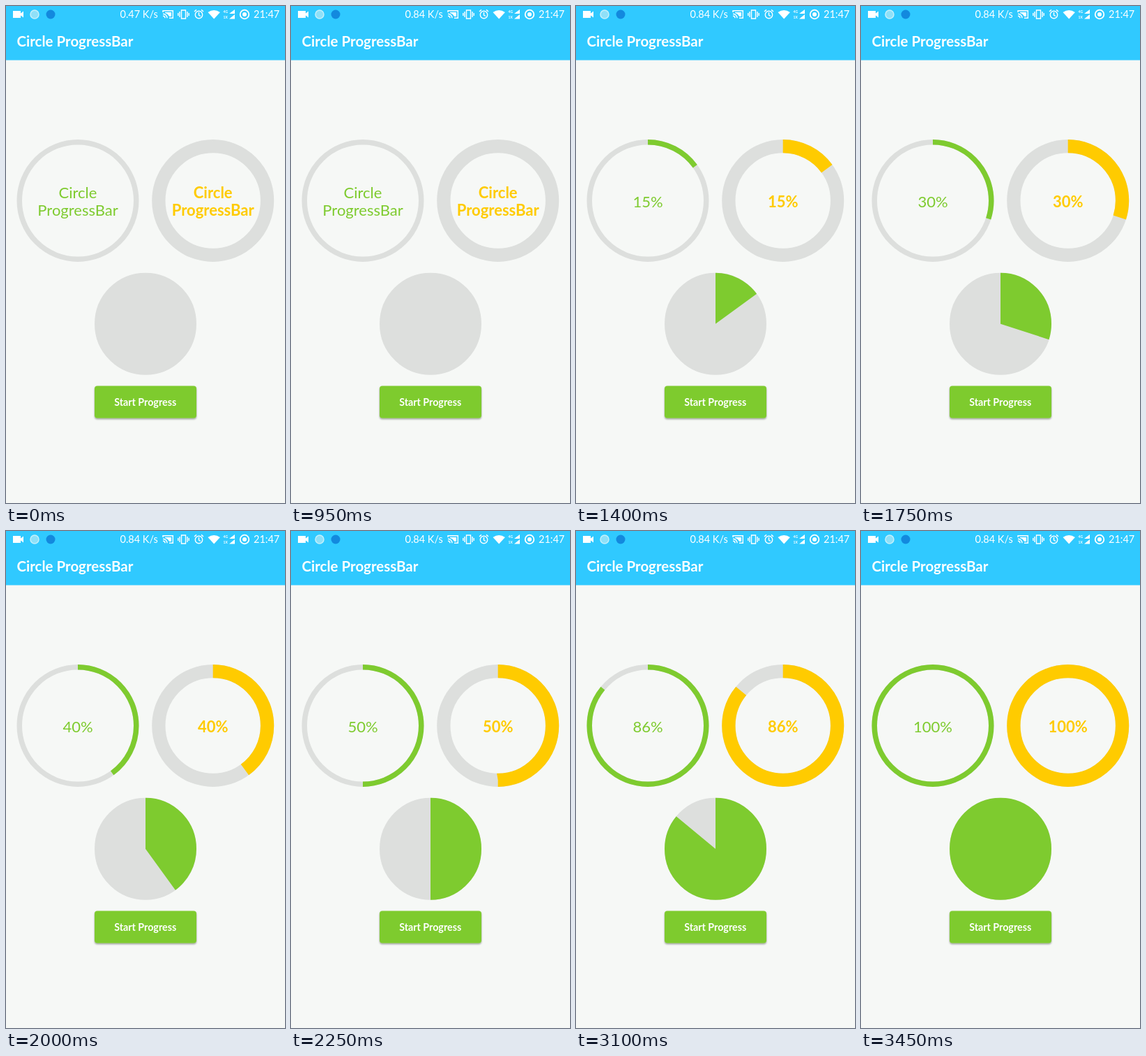
Animation of 400x711 px, one loop 3.95 s. Source, as an HTML page:

```html
<!DOCTYPE html>
<html lang="en">
<head>
<meta charset="utf-8">
<title>Circle ProgressBar</title>
<style>
  html, body { margin: 0; height: 100%; overflow: hidden; background: #f6f8f6; }
  svg { display: block; width: 100vw; height: 100vh; font-family: Lato, "Open Sans", sans-serif; }
  .bold { font-weight: 700; }
  .mid { text-anchor: middle; }
  .label { font-size: 22px; text-anchor: middle; }
  .line { fill: none; stroke: #fff; stroke-width: 1.4; }
  .track, .bar { fill: none; }
  .track { stroke: #dddfdd; }
  .green { stroke: #7ecb2f; }
  .yellow { stroke: #ffcb00; }
</style>
</head>
<body>
<svg viewBox="0 0 400 711">
  <defs>
    <filter id="shadow" x="-10%" y="-10%" width="120%" height="130%">
      <feDropShadow dx="0" dy="1.5" stdDeviation="1.2" flood-opacity=".4"/>
    </filter>
  </defs>
  <rect width="400" height="711" fill="#f6f8f6"/>
  <rect width="400" height="77.5" fill="#30c9ff"/>

  <g id="status" fill="#fff" font-size="14.5">
    <path d="M10 7h11v3.5l4-3v9l-4-3V17H10z"/>
    <circle cx="41" cy="12" r="6" fill="#8fe0f8" stroke="#c5f0fb" stroke-width="1.5"/>
    <circle cx="64" cy="12" r="6.5" fill="#1389de"/>
    <text id="speed" x="163.5" y="17">0.47 K/s</text>
    <path class="line" d="M225 9V6.7h14.3v10.6H234M225 11.2a6 6 0 0 1 6 6M225 14.2a3 3 0 0 1 3 3"/>
    <path d="M228 9h9v6h-3a9 9 0 0 0-6-5z"/>
    <path class="line" d="M251.5 6h6v12h-6zM249 8v8M260 8v8M246.8 10v4M262.2 10v4"/>
    <circle class="line" cx="276.5" cy="12.5" r="5.2"/>
    <path class="line" d="M276.5 9v4l2.5 1.5M270 8l3-2.6M283 8l-3-2.6"/>
    <path d="M289.5 9q8.700-6 17.400 0L298.200 18.500z"/>
    <g font-size="5" class="bold">
      <text x="311.500" y="9.500">4G</text>
      <text x="311.500" y="17.800">1X</text>
    </g>
    <path d="M328 5v6h-8zM328 12v6.500h-8z"/>
    <circle class="line" cx="342" cy="12" r="6.300" style="stroke-width:1.800"/>
    <circle cx="342" cy="12" r="3"/>
    <text x="355" y="17">21:47</text>
  </g>
  <text class="bold" x="15.500" y="58" font-size="20.500" fill="#fff">Circle ProgressBar</text>

  <g id="rings"></g>

  <rect x="127" y="543.500" width="146" height="46" rx="4" fill="#7ecb2f" filter="url(#shadow)"/>
  <text class="bold mid" x="199.700" y="572" font-size="14.300" fill="#fff">Start Progress</text>
</svg>
<script>
const LOOP = 3950, START = 1000;
const rings = [
  { x: 103, y: 278.5, outer: 87.5, width: 7.5, color: 'green', fill: '#7ecb2f', label: 'label' },
  { x: 296.7, y: 278.5, outer: 87.5, width: 19.3, color: 'yellow', fill: '#ffcb00', label: 'label bold' },
  { x: 200, y: 454.7, outer: 73, width: 73, color: 'green' }
];
// [time, percent] points of the progress
const points = [[1000, 0], [1400, 15], [1750, 30], [2250, 50], [2700, 70], [3200, 90], [3450, 100]];
// Moments at which the screen refreshes
const ticks = [1000, 1050, 1100, 1200, 1250, 1350, 1400, 1500, 1600, 1650, 1750, 1850,
  2000, 2050, 2150, 2250, 2350, 2400, 2500, 2600, 2700, 2850, 2950, 3050, 3100, 3200, 3350, 3450];

document.getElementById('rings').innerHTML = rings.map(({ x, y, outer, width, color, fill, label }) => {
  const circle = cls => `<circle class="${cls}" cx="${x}" cy="${y}" r="${outer - width / 2}"
    stroke-width="${width}" pathLength="100" transform="rotate(-90 ${x} ${y})"/>`;
  const text = (cls, dy, str) => `<text class="${cls}" x="${x}" y="${y + dy}">${str}</text>`;
  const labels = label ? `<g class="${label}" fill="${fill}">
    <g class="name">${text('', -3.5, 'Circle')}${text('', 21.5, 'ProgressBar')}</g>
    ${text('percent', 9, '')}</g>` : '';
  return circle('track') + circle('bar ' + color) + labels;
}).join('');

const all = selector => document.querySelectorAll(selector);
const bars = all('.bar'), names = all('.name'), percents = all('.percent');
const speed = document.getElementById('speed');

function percentAt(time) {
  const tick = ticks.filter(t => t <= time).pop() ?? START;
  const next = points.findIndex(([t]) => t >= tick);
  if (next === 0) return 0;
  const [t0, p0] = points[next - 1], [t1, p1] = points[next];
  return Math.round(p0 + (p1 - p0) * (tick - t0) / (t1 - t0));
}

function draw(now) {
  const time = now % LOOP, running = time >= START, percent = percentAt(time);
  speed.textContent = time < 950 ? '0.47 K/s' : '0.84 K/s';
  bars.forEach(bar => {
    bar.style.visibility = percent ? 'visible' : 'hidden';
    bar.setAttribute('stroke-dasharray', percent === 100 ? 'none' : `${percent} 100`);
  });
  names.forEach(name => name.style.display = running ? 'none' : '');
  percents.forEach(label => label.textContent = running ? percent + '%' : '');
}

let begin;
function frame(now) {
  begin ??= now;
  draw(now - begin);
  requestAnimationFrame(frame);
}
draw(0);
requestAnimationFrame(frame);
</script>
</body>
</html>
```
